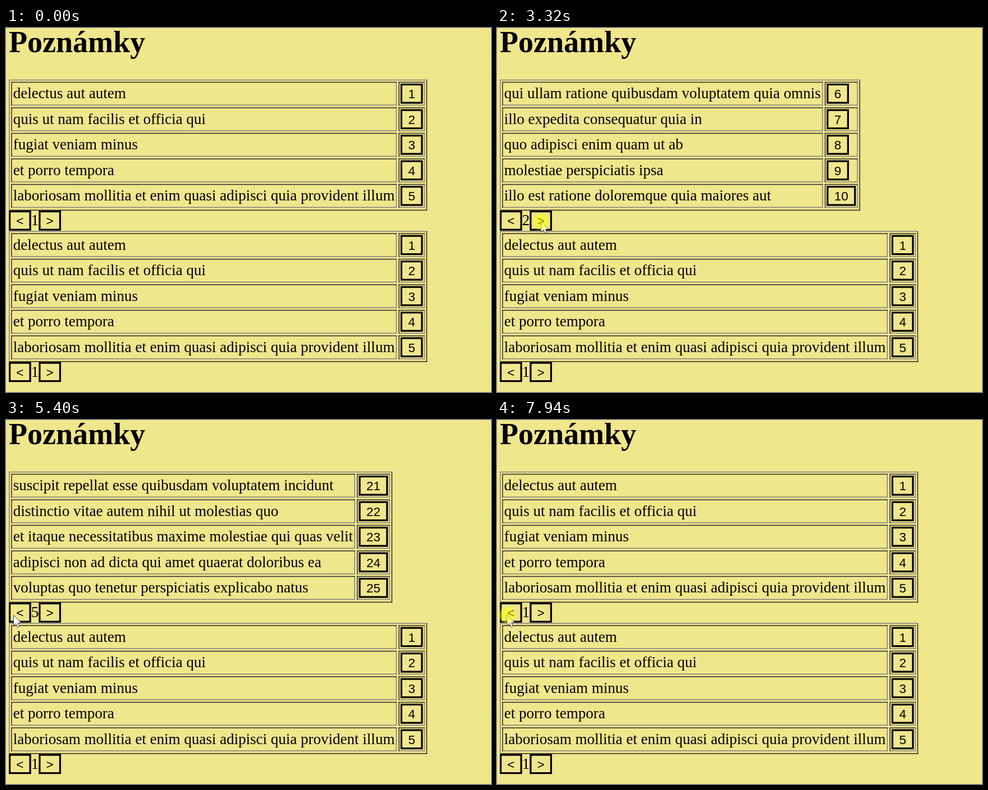
Write an HTML page with a canvas that moves like this. It is 864 by 648 pixels and loops after 8 s.

```html
<!DOCTYPE html>
<html lang="cs">
<head>
<meta charset="utf-8">
<title>Poznámky</title>
<style>
  html, body { margin: 0; width: 100%; height: 100%; overflow: hidden; background: #f0e68c; }
  canvas { display: block; }
</style>
</head>
<body>
<canvas id="stage" width="864" height="648"></canvas>
<script>
const ctx = document.getElementById('stage').getContext('2d');
const LOOP = 8000;
const SERIF = '"Liberation Serif", "Times New Roman", serif';
const SANS = '"Liberation Sans", Arial, sans-serif';
const TEXT_FONT = '27px ' + SERIF;
const GRAY = '#808080', DARK = '#2c2c2c';
const ROW = 45.5, BLOCK = 269.5;

const PAGES = [
  ['delectus aut autem',
   'quis ut nam facilis et officia qui',
   'fugiat veniam minus',
   'et porro tempora',
   'laboriosam mollitia et enim quasi adipisci quia provident illum'],
  ['qui ullam ratione quibusdam voluptatem quia omnis',
   'illo expedita consequatur quia in',
   'quo adipisci enim quam ut ab',
   'molestiae perspiciatis ipsa',
   'illo est ratione doloremque quia maiores aut'],
  ['vero rerum temporibus dolor',
   'ipsa repellendus fugit nisi',
   'et doloremque nulla',
   'repellendus sunt dolores architecto voluptatum',
   'ab voluptatum amet voluptas'],
  ['accusamus eos facilis sint et aut voluptatem',
   'quo laboriosam deleniti aut qui',
   'dolorum est consequatur ea mollitia in culpa',
   'molestiae ipsa aut voluptatibus pariatur dolor nihil',
   'ullam nobis libero sapiente ad optio sint'],
  ['suscipit repellat esse quibusdam voluptatem incidunt',
   'distinctio vitae autem nihil ut molestias quo',
   'et itaque necessitatibus maxime molestiae qui quas velit',
   'adipisci non ad dicta qui amet quaerat doloribus ea',
   'voluptas quo tenetur perspiciatis explicabo natus']
];

// [time, value]: the counter reacts on release, the table once loaded
const COUNTER = [[0, 1], [2390, 2], [3410, 3], [4060, 4], [4660, 5],
                 [5740, 4], [6130, 3], [6540, 2], [7000, 1]];
const TABLE = [[0, 1], [2590, 2], [3470, 3], [4120, 4], [4740, 5],
               [5740, 4], [6200, 3], [6620, 2], [7080, 1]];
// [pressed, released]
const PRESSES = [[2120, 2260], [3320, 3410], [3990, 4060], [4540, 4660],
                 [5600, 5740], [5990, 6130], [6400, 6540], [6880, 7000],
                 [7340, 7470], [7940, 8000]];

const NEXT = [78.5, 344.5], PREV = [16.5, 346.5];

const lerp = (a, b, u) => a + (b - a) * u;
const mix = (p, q, u) => [lerp(p[0], q[0], u), lerp(p[1], q[1], u)];
const valueAt = (track, t) => track.filter(k => k[0] <= t).pop()[1];

// Progress of a move sampled in n steps, the last one at time b
function stepped(t, a, b, n, first) {
  const k = Math.min(n - 1, Math.floor((t - a) / (b - a) * (n - 1) + 1e-6));
  return first ? (k + 1) / n : k / (n - 1);
}

function bezier(a, b, c, d, u) {
  const ab = mix(a, b, u), bc = mix(b, c, u), cd = mix(c, d, u);
  return mix(mix(ab, bc, u), mix(bc, cd, u), u);
}

function pointer(t) {
  if (t < 360) return null;
  if (t < 1180) {
    const u = stepped(t, 360, 1120, 12);
    return mix([822, 632], [139, 310], 1 - (1 - u) ** 1.5);
  }
  if (t < 4880)
    return bezier([139, 310], [60, 262], [-20, 330], NEXT, stepped(t, 1180, 1720, 9, true));
  if (t < 5330) return mix(NEXT, [12, 348], stepped(t, 4880, 5080, 4, true));
  if (t < 7940) return mix([12, 348], PREV, stepped(t, 5330, 5530, 3, true));
  return [18, 347];
}

function write(text, x, y, font, align = 'left') {
  ctx.font = font;
  ctx.textAlign = align;
  ctx.letterSpacing = '0.005px'; // keeps "fi" unjoined
  ctx.fillStyle = '#000';
  ctx.fillText(text, x, y);
}

// Bevelled frame: one colour for top and left, another for bottom and right
function bevel(x, y, r, b, light, shade) {
  const w = 1.5;
  ctx.fillStyle = shade;
  ctx.fillRect(x, b - w, r - x, w);
  ctx.fillRect(r - w, y, w, b - y);
  ctx.fillStyle = light;
  ctx.fillRect(x, y, r - x, w);
  ctx.fillRect(x, y, w, b - y);
}

function button(x, y, label) {
  const w = String(label).length > 1 ? 52 : 39.7, h = 35.7, line = 3.2;
  ctx.strokeStyle = '#000';
  ctx.lineWidth = line;
  ctx.strokeRect(x + line / 2, y + line / 2, w - line, h - line);
  write(label, x + w / 2, y + 26, '22.5px ' + SANS, 'center');
}

function block(top, page, count) {
  const rows = PAGES[page - 1];
  ctx.font = TEXT_FONT;
  const textEnd = 12.7 + Math.max(...rows.map(s => ctx.measureText(s).width));
  const cellEnd = textEnd + 3.7, btnCell = cellEnd + 3.3;
  const btnEnd = btnCell + (page > 1 ? 59 : 46.7);
  bevel(5, top, btnEnd + 4.1, top + 233.3, GRAY, DARK);
  rows.forEach((s, i) => {
    const y = top + 4 + i * ROW;
    bevel(9.2, y, cellEnd, y + 42.3, DARK, GRAY);
    bevel(btnCell, y, btnEnd, y + 42.3, DARK, GRAY);
    write(s, 12.7, y + 29.4, TEXT_FONT);
    button(btnCell + 3.4, y + 3.2, (page - 1) * 5 + i + 1);
  });
  const nav = top + 233.2;
  button(5, nav, '<');
  write(count, 51.4, nav + 26.2, TEXT_FONT, 'center');
  button(58.3, nav, '>');
}

function arrow([x, y]) {
  const s = 1.15;
  const pts = [[0, 0], [0, 16.5], [3.8, 13], [6.3, 18.6], [9, 17.4], [6.6, 12], [11.8, 12]];
  ctx.beginPath();
  pts.forEach(p => ctx.lineTo(x + p[0] * s, y + p[1] * s));
  ctx.closePath();
  ctx.fillStyle = '#fff';
  ctx.fill();
  ctx.strokeStyle = '#444';
  ctx.lineWidth = 1;
  ctx.lineJoin = 'round';
  ctx.stroke();
  ctx.lineJoin = 'miter';
}

function glow([x, y]) {
  const r = 16.5;
  const g = ctx.createRadialGradient(x, y, 0, x, y, r);
  g.addColorStop(0, 'rgba(255,255,0,.55)');
  g.addColorStop(0.7, 'rgba(255,255,0,.52)');
  g.addColorStop(1, 'rgba(255,255,0,0)');
  ctx.fillStyle = g;
  ctx.fillRect(x - r, y - r, 2 * r, 2 * r);
}

function draw(t) {
  ctx.fillStyle = '#f0e68c';
  ctx.fillRect(0, 0, 864, 648);
  write('Poznámky', 5, 42.7, 'bold 54px ' + SERIF);
  block(91.8, valueAt(TABLE, t), valueAt(COUNTER, t));
  block(91.8 + BLOCK, 1, 1);
  const p = pointer(t);
  if (p) arrow(p);
  if (PRESSES.some(([a, b]) => t >= a && t < b)) glow(p);
}

const start = performance.now();
function frame() {
  draw((performance.now() - start) % LOOP);
  requestAnimationFrame(frame);
}
frame();
</script>
</body>
</html>
```
